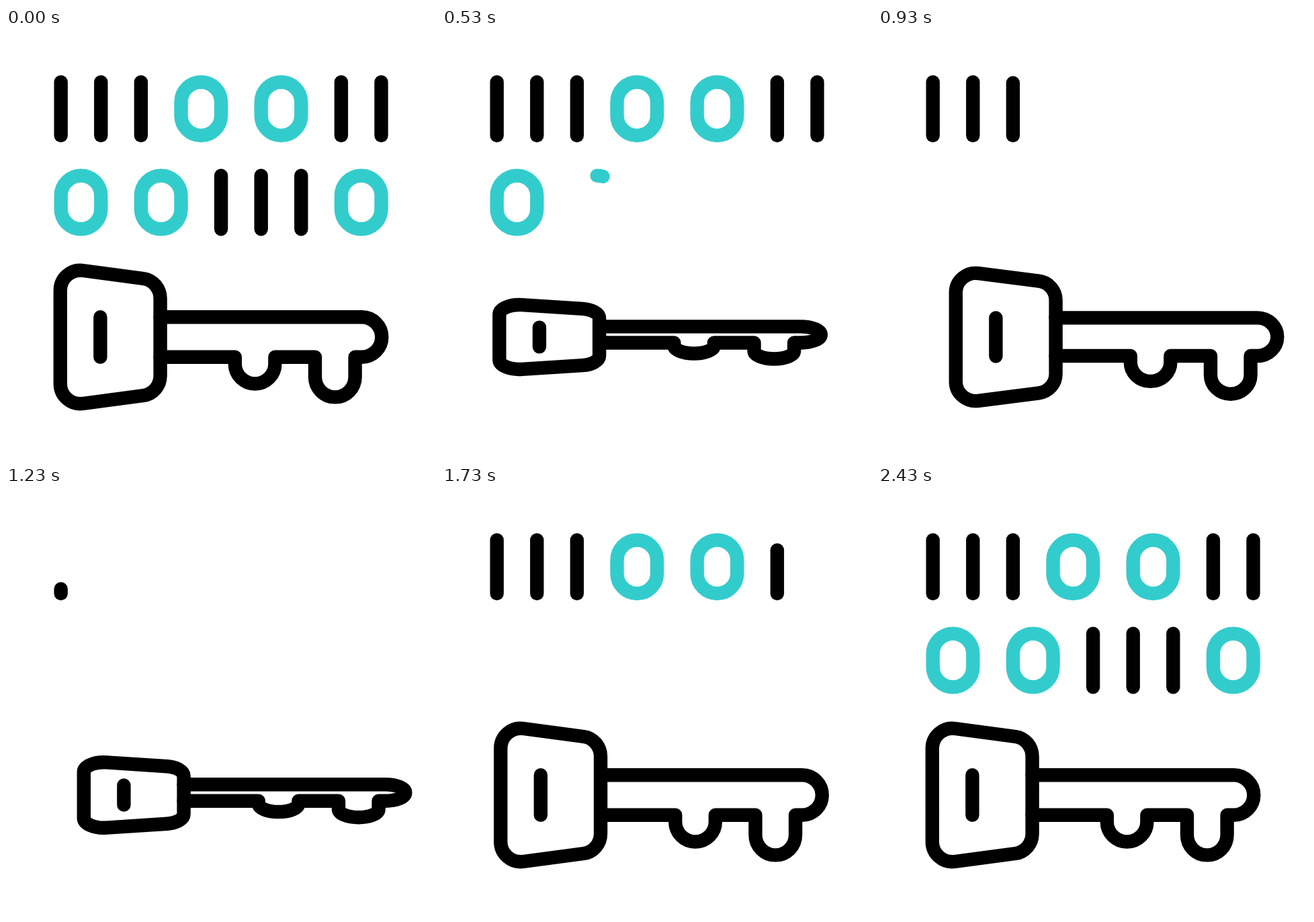
Recreate the animation shown at these times as an HTML page with a canvas. Size 640 by 640 pixels, loop 2.5 s.

```html
<!DOCTYPE html>
<html lang="en">
<head>
<meta charset="utf-8">
<title>Binary key</title>
<style>
  html, body { margin: 0; width: 100%; height: 100%; overflow: hidden; background: #fff; }
  canvas { display: block; width: 640px; height: 640px; }
</style>
</head>
<body>
<canvas id="stage" width="640" height="640"></canvas>
<script>
const ctx = document.getElementById('stage').getContext('2d');
const BLACK = '#000', TEAL = '#33cccc';
const LOOP = 2500, FRAME = LOOP / 75;
const PITCH = 59.6, R = PITCH / 2, BIT_HEIGHT = 79.5;
const ROWS = ['1110011', '0011110'.replace('11110', '1110')];

// Key frames as [frame, value]
const SHIFT = [[0, 0], [10, -51.5], [20, 35], [44.75, 35], [54.75, 0]];
const TWIST = [[6.25, 0], [16.25, 1], [26.25, 0], [36.25, 1], [46.25, 0]];
const BITS = [[2, 12], [16, 8.12], [28, 2.93], [35, 0], [36.5, 0],
              [37, 0.18], [47, 3.855], [59, 8.34], [73, 13]];

const clamp = u => Math.min(1, Math.max(0, u));
const smooth = u => u * u * (3 - 2 * u);
const linear = u => u;

function valueAt(keys, frame, ease) {
  const next = keys.findIndex(key => key[0] > frame);
  if (next === 0) return keys[0][1];
  if (next < 0) return keys[keys.length - 1][1];
  const [f0, v0] = keys[next - 1], [f1, v1] = keys[next];
  return v0 + (v1 - v0) * ease((frame - f0) / (f1 - f0));
}

function layoutBits() {
  const bits = [];
  ROWS.forEach((row, r) => {
    let slot = 0;
    for (const digit of row) {
      const zero = digit === '0';
      bits.push({
        zero,
        x: 81.7 + PITCH * (slot + (zero ? 0.5 : 0)),
        y: 80.5 + 139.2 * r,
        turn: r === 0 ? -1 : 1
      });
      slot += zero ? 2 : 1;
    }
  });
  return bits;
}
const bits = layoutBits();
BITS[0][1] = BITS[BITS.length - 1][1] = bits.length;

function drawBit(bit, part) {
  if (part <= 0) return;
  ctx.save();
  ctx.translate(bit.x, bit.y);
  ctx.strokeStyle = bit.zero ? TEAL : BLACK;
  ctx.beginPath();
  if (bit.zero) {
    const low = BIT_HEIGHT - R, length = 2 * Math.PI * R + 2 * (low - R);
    ctx.scale(bit.turn, 1);
    ctx.arc(0, R, R, -Math.PI / 2, 0);
    ctx.arc(0, low, R, 0, Math.PI);
    ctx.arc(0, R, R, Math.PI, Math.PI * 1.5);
    if (part < 1) ctx.setLineDash([length * part, length * 2]);
  } else {
    ctx.moveTo(0, BIT_HEIGHT);
    ctx.lineTo(0, BIT_HEIGHT * (1 - part));
  }
  ctx.stroke();
  ctx.restore();
}

// Squashes the outline about a horizontal axis while the line weight stays
function strokeSquashed(shift, axis, scale, trace) {
  ctx.save();
  ctx.translate(shift, axis);
  ctx.scale(1, scale);
  ctx.translate(0, -axis);
  ctx.beginPath();
  trace();
  ctx.restore();
  ctx.stroke();
}

function traceHead() {
  ctx.moveTo(80.8, 390.5);
  ctx.bezierCurveTo(80.8, 372.5, 96.6, 358.6, 114.5, 361);
  ctx.lineTo(204.5, 373);
  ctx.bezierCurveTo(219, 375, 229.6, 387.6, 229.6, 402.5);
  ctx.lineTo(229.6, 517.5);
  ctx.bezierCurveTo(229.6, 532.4, 219, 545, 204.5, 547);
  ctx.lineTo(114.5, 559);
  ctx.bezierCurveTo(96.6, 561.4, 80.8, 547.5, 80.8, 529.5);
  ctx.closePath();
  ctx.moveTo(140.4, 430.2);
  ctx.lineTo(140.4, 489.8);
}

function traceShaft() {
  const top = 430.2, bottom = top + PITCH;
  ctx.moveTo(229.6, top);
  ctx.lineTo(529.5, top);
  ctx.arc(529.5, top + R, R, -Math.PI / 2, Math.PI / 2);
  ctx.lineTo(519.6, bottom);
  ctx.arc(489.8, 519.6, R, 0, Math.PI);
  ctx.lineTo(460, bottom);
  ctx.lineTo(400.4, bottom);
  ctx.arc(370.6, 499.7, R, 0, Math.PI);
  ctx.lineTo(340.8, bottom);
  ctx.lineTo(229.6, bottom);
}

function draw(time) {
  const frame = Math.floor((time % LOOP + 3.4) / FRAME);
  ctx.fillStyle = '#fff';
  ctx.fillRect(0, 0, 640, 640);
  ctx.lineWidth = 20.4;
  ctx.lineCap = ctx.lineJoin = 'round';

  const shown = valueAt(BITS, frame, linear);
  bits.forEach((bit, i) => drawBit(bit, smooth(clamp(shown - i))));

  const shift = valueAt(SHIFT, frame, smooth);
  const twist = valueAt(TWIST, frame, smooth);
  ctx.strokeStyle = BLACK;
  strokeSquashed(shift, 460, 1 - 0.517 * twist, traceHead);
  strokeSquashed(shift, 454, 1 - 0.598 * twist, traceShaft);
}

const start = performance.now();
function tick() {
  draw(performance.now() - start);
  requestAnimationFrame(tick);
}
draw(0);
requestAnimationFrame(tick);
</script>
</body>
</html>
```
